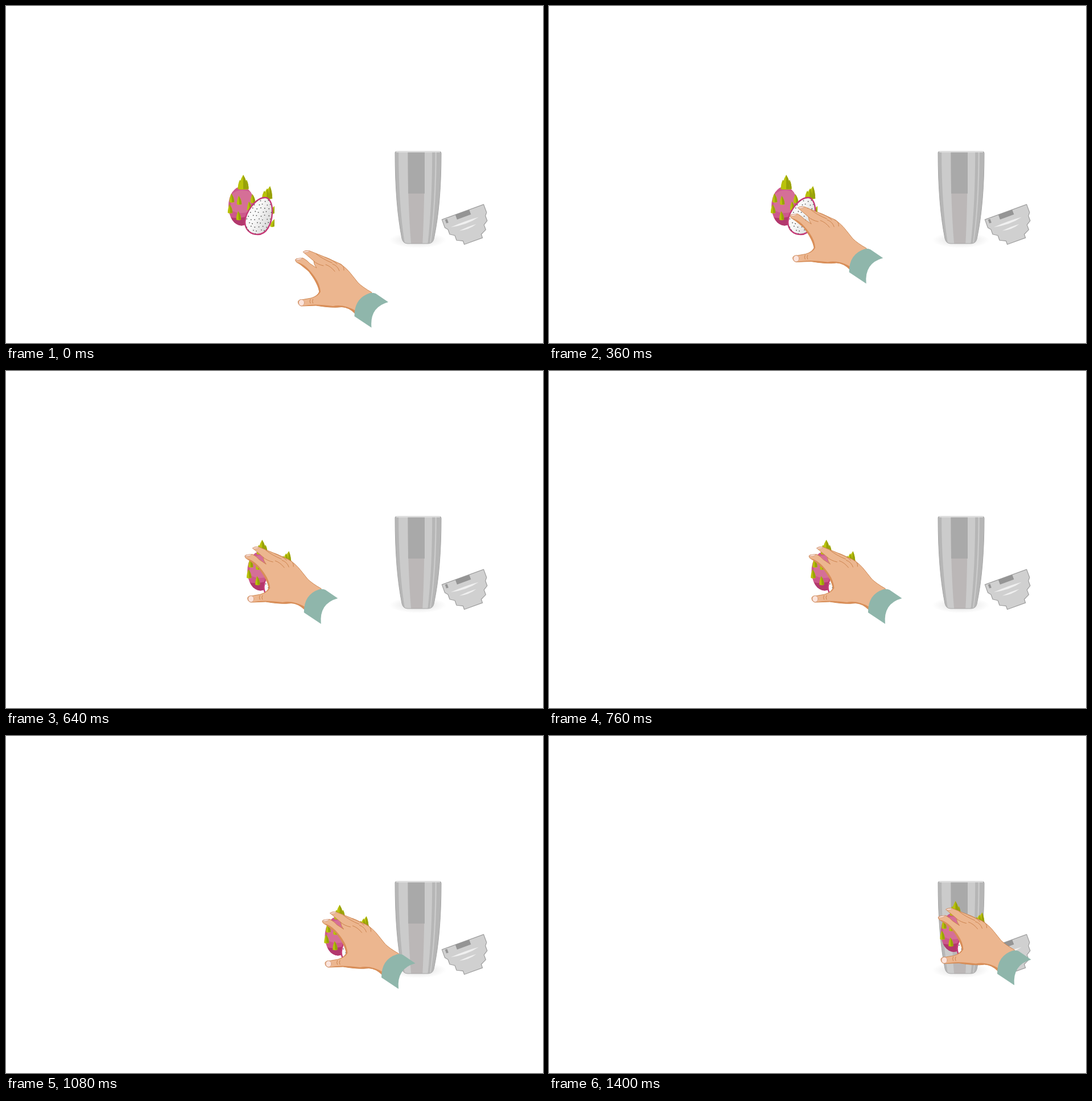
Animation of 944 by 593 pixels, one loop 1.44 s. Source, as an HTML page:

```html
<!DOCTYPE html>
<html lang="en">
<head>
<meta charset="utf-8">
<title>Fruit and shaker</title>
<style>
html, body { margin: 0; width: 100%; height: 100%; overflow: hidden; background: #fff; }
svg { display: block; width: 944px; height: 593px; }
</style>
</head>
<body>
<svg viewBox="0 0 944 593">
  <defs>
    <radialGradient id="floor">
      <stop offset=".5" stop-color="#aaa" stop-opacity=".2"/>
      <stop offset="1" stop-color="#aaa" stop-opacity="0"/>
    </radialGradient>
    <linearGradient id="flesh" x1="0" y1="0" x2="1" y2=".6">
      <stop offset=".5" stop-color="#f8f8f8"/>
      <stop offset="1" stop-color="#d8d8d8"/>
    </linearGradient>
    <path id="cupShape" d="M684 258Q684 256 687 256H762Q765 256 765 259Q765 350 752 410Q750 418 742 418H706Q698 418 696 409Q684 350 684 258Z"/>
    <path id="egg" d="M455.500 337C463 337 469 348 468 364C467 384 458 402 442.500 402C429 402 420 393 420 380C421 363 439 337 455.500 337Z"/>
    <clipPath id="cupClip"><use href="#cupShape"/></clipPath>
    <clipPath id="eggClip"><use href="#egg"/></clipPath>
    <clipPath id="bodyClip"><ellipse cx="414" cy="352" rx="23" ry="34.500"/></clipPath>
  </defs>

  <ellipse cx="724" cy="412" rx="50" ry="14" fill="url(#floor)"/>
  <g id="cup" clip-path="url(#cupClip)"></g>
  <use href="#cupShape" fill="none" stroke="#a6a6a6"/>
  <path d="M686 256.500H763" stroke="#e4e4e4" stroke-width="2"/>

  <g transform="translate(803 362.500) rotate(-20)">
    <path id="lid" fill="#d0d0d0" stroke="#9e9e9e" stroke-width="1.200" stroke-linejoin="round"/>
    <path d="M-14 0H12V9H-14ZM-34 2H-30V9H-34Z" fill="#959595"/>
    <path d="M-29 18Q0 24 23 18Q0 16 -29 18ZM-17 29Q0 33 15 28Q0 27 -17 29Z" fill="#f0f0f0"/>
  </g>

  <g id="fruit">
    <g clip-path="url(#bodyClip)">
      <path d="M390 316H440V388H390Z" fill="#cd588c"/>
      <path d="M398 330Q412 319 431 328V361Q405 369 394 357Z" fill="#d56f97"/>
      <path d="M388 369Q405 379 439 365V390H388Z" fill="#b2386d"/>
    </g>
    <g id="leaves"></g>
    <use href="#egg" fill="url(#flesh)" stroke="#c53976" stroke-width="2.400"/>
    <g id="seeds" clip-path="url(#eggClip)" fill="#555"></g>
  </g>

  <g id="hand" stroke-linejoin="round" stroke-linecap="round">
    <path d="M522.500 432.500Q526 429.500 534 431L560 441.500 585 452.500Q598 460 607 472L619 487Q627 495 643 504L614 541Q603 530 590 529.500Q575 532 545 527L519 528Q513 526 513.500 520Q515 516 522 516.500L536 514Q547 511 551 503Q550 493 544 483L533 468Q528 460 520 456L511 451Q507 447 510 445L522 443.500Q530 448 534 453L546 461Q541 455 541 449Z" fill="#ecb68f" stroke="#cb8049" stroke-width=".9"/>
    <g fill="#d98e58">
      <path d="M512 451Q527 454 543 477Q552 490 553 503Q548 512 536 514Q547 511 550.500 503Q548 489 533 468Z"/>
      <path d="M520 528Q540 523 575 528Q594 524 616 537L613 541Q602 530 590 529.500Q575 532 545 527Z"/>
    </g>
    <g fill="#fbe4dc" stroke="#cf9272" stroke-width=".7">
      <path d="M509 446.500Q512 443.500 521 443.500Q519 447 511 447.500ZM522.500 432.500Q526 430 534 431Q532 434 524 434Z"/>
      <ellipse cx="519.500" cy="522" rx="5" ry="5.500"/>
    </g>
    <g id="folds" fill="none" stroke="#c97e48" stroke-width=".9">
      <path d="M541 449Q548 455 558 457M545 436Q556 445 573 452M561 442Q574 446 582 454"/>
    </g>
    <path d="M640 505Q645 504 650 506L672 521Q639 530 642.500 566L612.500 546Q612 514 640 505Z" fill="#8fb6ab"/>
  </g>
</svg>
<script>
const NS = "http://www.w3.org/2000/svg";
const get = id => document.getElementById(id);
function add(id, tag, attrs) {
  const el = document.createElementNS(NS, tag);
  for (const k in attrs) el.setAttribute(k, attrs[k]);
  get(id).append(el);
}

// Cup stripes follow the taper; k runs from -1 (left) to 1 (right)
function stripe(k0, k1, fill) {
  const x = (k, half) => 724.5 + k * half;
  add("cup", "path", { fill, d:
    `M${x(k0, 40.5)} 255Q${x(k0, 40.5)} 350 ${x(k0, 27.5)} 419` +
    `H${x(k1, 27.5)}Q${x(k1, 40.5)} 350 ${x(k1, 40.5)} 255Z` });
}
stripe(-1.1, 1.1, "#b6b6b6");
stripe(-0.85, 0.61, "#cbcbcb");
stripe(-0.45, 0.28, "#bbb7b7");
stripe(0.74, 0.8, "#cbcbcb");
add("cup", "path", { fill: "#a9a9a9", d: "M706.500 255H736V330H707Z" });

// Lid: four shrinking tiers, mirrored
const side = [[39, 0]];
for (let i = 0; i < 4; i++) {
  const w = 39 - 4 * i ** 1.55;
  if (i) side.push([w, 14 * i + 6]);
  side.push([w, Math.min(15 + 14 * i, 54.5)]);
}
const mirror = side.map(([x, y]) => [-x, y]).reverse();
get("lid").setAttribute("d", "M" + side.concat(mirror).join("L") + "Z");

function leaf(x, y, h, lean = -1) {
  const w = h * 0.28, tip = `${x + lean} ${y - h}`;
  const right = `Q${x + w} ${y - h * 0.55} ${x + w} ${y}`;
  add("leaves", "path", { fill: "#b9c20a", d: `M${tip}${right}Q${x} ${y + 2} ${x - w} ${y}Q${x - w} ${y - h * 0.55} ${tip}Z` });
  add("leaves", "path", { fill: "#98a108", d: `M${tip}${right}H${x}Z` });
}
for (const i of [-1, 1, 0]) {
  leaf(417 + 5 * i, 322, 25 - 9 * Math.abs(i), i);
  leaf(458 + 4 * i, 339, 18 + 4 * i, 1 + i);
}
for (const [x, y] of [[397, 345], [410, 349], [394, 364], [409, 376], [434, 346], [428, 359]]) leaf(x, y, 15);
for (const y of [365, 388]) leaf(468, y, 13, 4);

for (let r = 0; r < 10; r++) {
  for (let c = 0; c < 8; c++) {
    const cx = 420 + c * 7 + (r % 2) * 3.5 + Math.sin(r * 5 + c * 3);
    add("seeds", "circle", { cx, cy: 343 + r * 6.5 + Math.sin(c * 4 + r), r: 0.9 });
  }
}

for (let i = 0; i < 3; i++) add("folds", "path", { d: `M${562 + 12 * i} ${455 - i}q9 3 ${16 - 4 * i} 12` });
for (const x of [535, 539.5]) add("folds", "path", { d: `M${x} 516q-2 4 0 7` });

// Hand path: step, dx, dy
const STEP = 40, COUNT = 36, GRAB = 13;
const keys = [
  [0, 0, 0], [6, -57, -45], [GRAB, -122, -121], [14, -113.5, -121],
  [27, 47.5, -121], [31, 106.5, -121], [35, 175.5, -127.5]
];
function handAt(s) {
  const i = Math.max(1, keys.findIndex(k => k[0] >= s));
  const a = keys[i - 1], b = keys[i], u = (s - a[0]) / (b[0] - a[0]);
  return [1, 2].map(n => a[n] + (b[n] - a[n]) * u);
}
const grip = handAt(GRAB);
const move = (id, x, y) => get(id).setAttribute("transform", `translate(${x} ${y})`);

function draw(ms) {
  const s = Math.floor(ms / STEP) % COUNT;
  const [x, y] = handAt(s);
  const held = s > GRAB;
  move("hand", x, y);
  move("fruit", held ? x - grip[0] : 0, held ? y - grip[1] : 0);
}

let start;
function tick(now) {
  start ??= now;
  draw(Math.max(0, now - start));
  requestAnimationFrame(tick);
}
draw(0);
requestAnimationFrame(tick);
</script>
</body>
</html>
```
